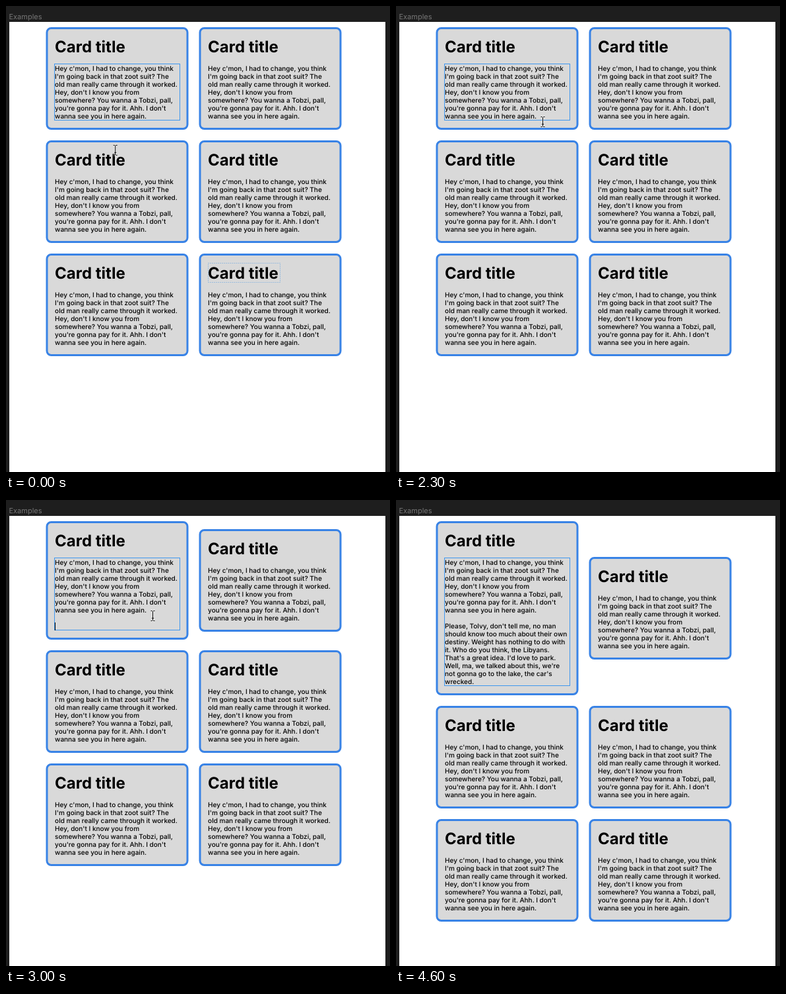
These frames come from a looping animation (582x704 px, 5000 ms). An HTML page:

```html
<!DOCTYPE html>
<html lang="en">
<head>
<meta charset="utf-8">
<title>Card grid</title>
<style>
  html, body { margin: 0; width: 100%; height: 100%; overflow: hidden; background: #1e1e1e; }
  svg { display: block; width: 582px; height: 704px; }
  text {
    font-family: Inter, sans-serif;
    font-optical-sizing: none;
    text-rendering: geometricPrecision;
    white-space: pre;
  }
  .label { font-size: 11px; fill: #777; }
  .title { font-size: 24px; font-weight: 700; }
  .body { font-size: 10px; font-weight: 500; }
  .card { fill: #d9d9d9; stroke: #3983e6; stroke-width: 3; }
  .edit { fill: none; stroke: #3f97ee; }
  .hover { fill: none; stroke: #5a9fe0; stroke-dasharray: 1 2; }
</style>
</head>
<body>
<svg id="stage" viewBox="0 0 582 704"></svg>
<script>
const LOOP = 5000;
const CARD = { x: 60.5, y: 32, w: 216, h: 155, gap: 16 };
const LINE = 12;

const BODY = [
  "Hey c'mon, I had to change, you think",
  "I'm going back in that zoot suit? The",
  "old man really came through it worked.",
  "Hey, don't I know you from",
  "somewhere? You wanna a Tobzi, pall,",
  "you're gonna pay for it. Ahh. I don't",
  "wanna see you in here again."
];
const PASTED = [
  "Please, Tolvy, don't tell me, no man",
  "should know too much about their own",
  "destiny. Weight has nothing to do with",
  "it. Who do you think, the Libyans.",
  "That's a great idea. I'd love to park.",
  "Well, ma, we talked about this, we're",
  "not gonna go to the lake, the car's",
  "wrecked."
];

// Lines added to the first card, from each moment on
const GROWTH = [[0, 0], [2600, 1], [2800, 2], [3200, 9]];

// Visible spans of the caret: start, end, x, line index
const CARETS = [
  [1300, 1600, 210.5, 6],
  [1600, 2000, 213.5, 6],
  [2600, 2800, 74.5, 7],
  [2800, 3200, 74.5, 8],
  [3200, 3700, 118.5, 15],
  [4100, 4600, 118.5, 15]
];

const stage = document.getElementById("stage");

function add(parent, tag, attrs, content) {
  const node = document.createElementNS("http://www.w3.org/2000/svg", tag);
  for (const key in attrs) node.setAttribute(key, attrs[key]);
  if (content) node.textContent = content;
  return parent.appendChild(node);
}

function addLines(parent, lines, y) {
  const group = add(parent, "g", {});
  lines.forEach((line, i) =>
    add(group, "text", { class: "body", x: 13.6, y: y + i * LINE }, line));
  return group;
}

function addCard(index) {
  const group = add(stage, "g", {});
  const frame = add(group, "rect", {
    class: "card", x: 1.5, y: 1.5, width: CARD.w - 3, height: CARD.h - 3, rx: 6.5
  });
  add(group, "text", { class: "title", x: 13.6, y: 38 }, "Card title");
  addLines(group, BODY, 66);
  return { group, frame, col: index % 2, row: Math.floor(index / 2) };
}

const show = (node, visible) => node.setAttribute("display", visible ? "inline" : "none");
const place = (node, x, y) => node.setAttribute("transform", `translate(${x} ${y})`);
const progress = (t, start, end) => Math.min(1, Math.max(0, (t - start) / (end - start)));

add(stage, "rect", { width: 582, height: 704, fill: "#1e1e1e" });
add(stage, "text", { class: "label", x: 4.5, y: 20 }, "Examples");
add(stage, "rect", { x: 5, y: 24, width: 570, height: 680, fill: "#fff" });

const cards = Array.from({ length: 6 }, (_, i) => addCard(i));
const pasted = addLines(cards[0].group, PASTED, 66 + 8 * LINE);
const editBox = add(stage, "rect", { class: "edit", x: 73.5, y: 87.5, width: 190 });
const hoverBox = add(stage, "rect", { class: "hover", x: 306.5, y: 388.5, width: 109, height: 29 });
const caret = add(stage, "rect", { width: 1, height: 12 });

const pointer = add(stage, "g", { fill: "none" });
const beam = "M-3 -7.5H-1L0 -6.5L1 -7.5H3M-3 7.5H-1L0 6.5L1 7.5H3M0 -6.5V6.5M-1.5 3.5H1.5";
add(pointer, "path", { d: beam, stroke: "#fff", "stroke-width": 2.4, "stroke-opacity": 0.6 });
add(pointer, "path", { d: beam, stroke: "#000", "stroke-width": 1 });

function layout(extra) {
  for (const { group, frame, col, row } of cards) {
    const isFirst = row === 0 && col === 0;
    const shift = row > 0 ? extra : isFirst ? 0 : extra / 2;
    place(group, CARD.x + col * (CARD.w + CARD.gap), CARD.y + row * (CARD.h + CARD.gap) + shift);
    if (isFirst) frame.setAttribute("height", CARD.h - 3 + extra);
  }
  editBox.setAttribute("height", 85 + extra);
}

function movePointer(t) {
  const arrive = 1 - (1 - progress(t, 0, 900)) ** 3;
  const leave = progress(t, 4100, 4600) ** 2;
  place(pointer, 165.5 + 57 * arrive + 16 * leave, 218 - 43 * arrive - 190 * leave);
}

function draw(t) {
  const lines = GROWTH.filter(([start]) => t >= start).pop()[1];
  layout(lines * LINE);
  show(pasted, lines > 2);
  show(hoverBox, t < 100);

  const span = CARETS.find(([start, end]) => t >= start && t < end);
  show(caret, span);
  if (span) place(caret, span[2] - 0.5, 89 + span[3] * LINE);

  movePointer(t);
}

function tick() {
  draw(performance.now() % LOOP);
  requestAnimationFrame(tick);
}
tick();
</script>
</body>
</html>
```
